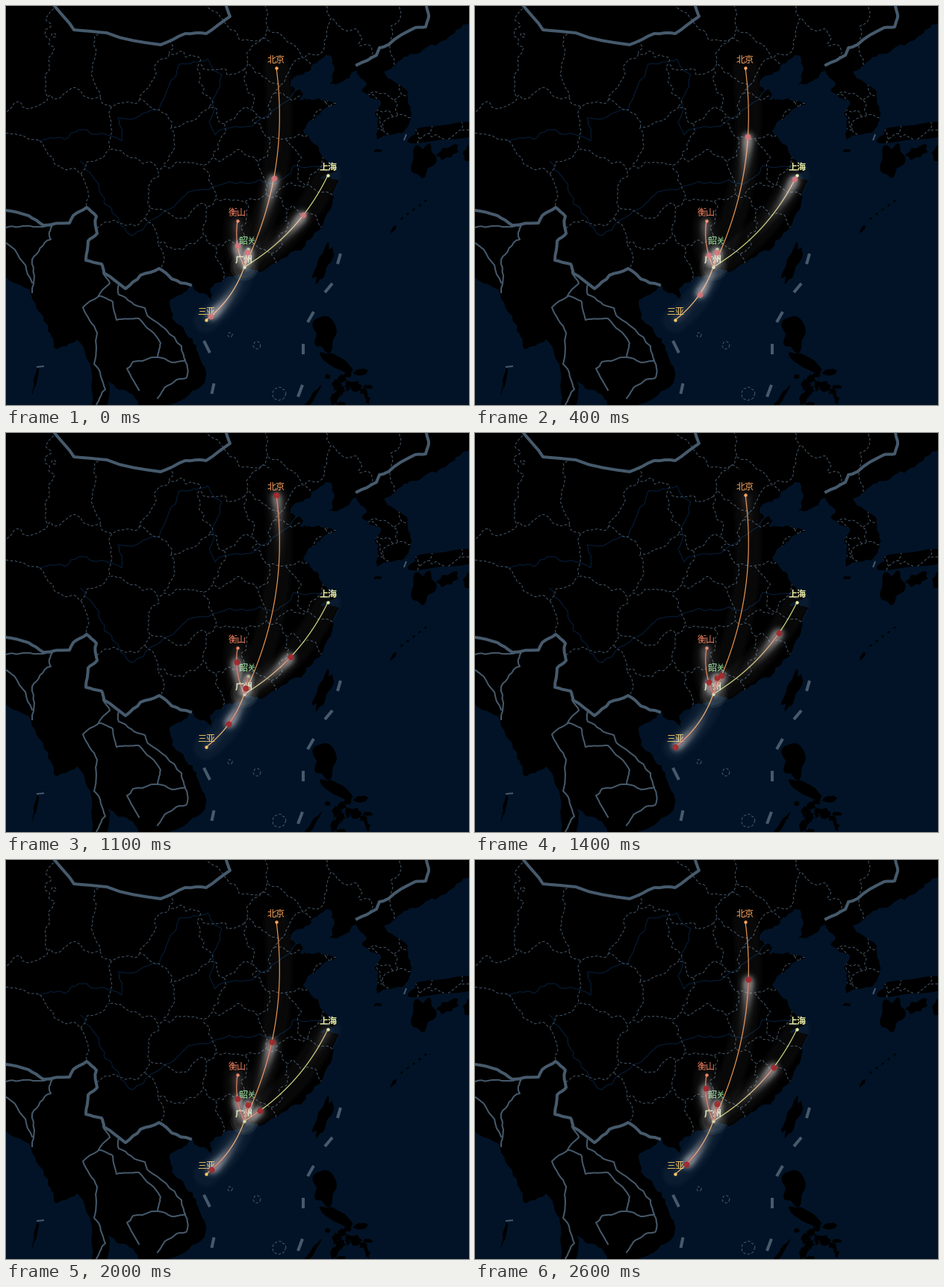
These frames come from a looping animation (620x535 px, 2700 ms). A matplotlib script:

```python
import numpy as np
import matplotlib.pyplot as plt
from matplotlib.animation import FuncAnimation

W, H, DPI = 620, 535, 100
PX = 72 / DPI
FRAMES, STEP = 27, 100
SEA, LAND, BORDER, PROVINCE, RIVER = "#021327", "#000000", "#465a6c", "#45586a", "#06203f"

plt.rcParams["font.family"] = "Noto Sans CJK JP"
rng = np.random.default_rng(4)

fig = plt.figure(figsize=(W / DPI, H / DPI), dpi=DPI, facecolor=SEA)
ax = fig.add_axes([0, 0, 1, 1])
ax.set_axis_off()


# ---- map ----

def rough(*coords, amp=0.1, limit=3.0, rounds=3):
    """Turn flat x, y key points into a polyline with small natural wiggles."""
    pts = np.array(coords, float).reshape(-1, 2)
    for _ in range(rounds):
        d = np.diff(pts, axis=0)
        size = np.hypot(*d.T)[:, None]
        shift = np.clip(size * rng.normal(0, amp, size.shape), -limit, limit)
        normal = np.column_stack([-d[:, 1], d[:, 0]]) / np.maximum(size, 1e-6)
        out = np.empty((len(pts) * 2 - 1, 2))
        out[::2] = pts
        out[1::2] = (pts[:-1] + pts[1:]) / 2 + normal * shift
        pts = out
    return pts


def land(pts):
    return ax.fill(*pts.T, color=LAND, lw=0, zorder=1)[0]


def line(pts, color, width, z=4, **style):
    ax.plot(*pts.T, color=color, lw=width * PX, zorder=z, **style)


def island(x, y, rx, ry, tilt=0):
    """A ragged ellipse, tilted clockwise in degrees."""
    a = np.linspace(0, 2 * np.pi, 36)
    wobble = 1 + sum(rng.normal(0, 0.08) * np.sin(k * a + k) for k in range(2, 8))
    u, v, c, s = rx * wobble * np.cos(a), ry * wobble * np.sin(a), *np.array(
        [np.cos(np.radians(tilt)), np.sin(np.radians(tilt))])
    return land(np.column_stack([x + u * c - v * s, y + u * s + v * c]))


def wave_noise(x, y):
    """Sum of random plane waves, larger for longer wavelengths."""
    total = np.zeros_like(x)
    for length in np.geomspace(10, 90, 14):
        angle, phase = rng.uniform(0, 2 * np.pi, 2)
        k = 2 * np.pi / length
        total += 0.05 * length * np.sin(k * (x * np.cos(angle) + y * np.sin(angle)) + phase)
    return total


def provinces(seeds, outline):
    """Dashed borders between the areas nearest to each seed, on a warped grid."""
    x, y = np.meshgrid(np.arange(0, W + 2, 2.0), np.arange(0, H + 2, 2.0))
    wx, wy = x + wave_noise(x, y), y + wave_noise(x, y)
    dist = np.array([np.hypot(wx - sx, wy - sy) for sx, sy in seeds])
    nearest = dist.argmin(axis=0)
    for i in range(len(seeds) - 1):
        gap = np.ma.masked_where(nearest < i, dist[i] - dist[i + 1:].min(axis=0))
        if gap.count() == 0 or not gap.min() < 0 < gap.max():
            continue
        cs = ax.contour(x, y, gap, levels=[0], colors=PROVINCE, linewidths=PX, zorder=3)
        cs.set_linestyle((0, (3.5, 2.5)))
        cs.set_clip_path(outline)


def draw_map():
    north_line = rough(65, 0, 91, 32, 135, 36, 207, 52, 240, 37, 268, 37, 300, 14, 295, 0,
                       amp=0.02, rounds=2)
    east_line = rough(563, 0, 566, 15, 562, 28, 548, 29, 512, 52, 500, 56, 496, 66, 470, 79,
                      amp=0.03, rounds=2)
    south_line = rough(0, 274, 30, 281, 50, 294, 85, 291, 90, 281, 108, 270, 121, 282, 122, 305,
                       110, 315, 107, 341, 128, 346, 131, 358, 160, 379, 180, 361, 205, 352,
                       222, 366, 247, 374, amp=0.04, rounds=2)
    coast = rough(470, 86, 446, 103, 433, 105, 440, 84, 436, 69, 428, 66, 405, 88, 384, 97,
                  381, 107, 398, 117, 394, 126, 418, 124, 444, 131, 416, 147, 398, 167,
                  419, 190, 433, 212, 441, 222, 421, 231, 446, 235, 437, 264, 421, 299,
                  395, 328, 345, 355, 325, 352, 311, 361, 283, 371, 273, 380, 275, 396,
                  265, 385, 247, 374, amp=0.12)
    corner = np.array([[-20, 274], [-20, -20], [65, -20]])
    china = land(np.vstack([north_line, east_line, coast, south_line[::-1], corner]))

    korea = land(rough(640, -20, 640, 8, 612, 25, 588, 46, 555, 62, 528, 73, 506, 88, 536, 112,
                       541, 150, 534, 168, 497, 179, 499, 152, 494, 142, 502, 128, 476, 113,
                       483, 104, 469, 86, 450, 50, 40, 50, 40, -20))
    land(rough(-20, 274, 110, 260, 240, 345, 247, 375, 220, 394, 222, 418, 250, 446, 266, 484,
               266, 505, 220, 534, 190, 560, 170, 521, 136, 503, 133, 560, 122, 560, 115, 492,
               95, 447, 65, 459, 56, 428, 31, 380, -20, 350))

    island(425, 345, 8, 27, 22)
    island(558, 207, 14, 23, 12)
    island(592, 196, 13, 8, -20)
    island(626, 198, 14, 12)
    island(498, 194, 5, 2)
    island(427, 438, 16, 22)
    island(443, 478, 24, 8, 30)
    island(409, 527, 3, 20, 35)
    island(40, 500, 2, 16, 12)
    island(519, 299, 2, 6, 35)
    japan = island(592, 169, 56, 11, -8)
    for x, y in rng.uniform((430, 490), (488, 535), (22, 2)):
        island(x, y, *rng.uniform(2, 7, 2))
    for x in np.linspace(530, 562, 5):
        island(x, 285 - 0.75 * (x - 530), 2, 1.2, -35)

    seats = [(362, 84), (379, 101), (338, 115), (306, 118), (300, 50), (372, 145), (325, 180),
             (252, 182), (222, 135), (192, 165), (85, 160), (165, 245), (238, 255), (235, 295),
             (165, 335), (252, 342), (319, 345), (298, 285), (313, 230), (348, 288), (390, 312),
             (410, 258), (372, 212), (402, 195), (435, 228), (445, 65), (480, 20), (45, 245),
             (30, 72), (90, 75), (150, 75), (400, 20)]
    provinces(seats, china)
    provinces(rng.uniform((495, 105), (542, 180), (9, 2)), korea)
    provinces([(x, 170 + 8 * (-1) ** k) for k, x in enumerate(range(550, 640, 14))], japan)
    for x, y, r in ((366, 520, 9), (336, 455, 5), (300, 441, 3)):
        a = np.linspace(0, 2 * np.pi, 12)
        ring = np.column_stack([x + r * np.cos(a), y + r * np.sin(a)])
        line(rough(*ring.ravel(), rounds=1), PROVINCE, 1, 3, dashes=(3.5, 2.5))

    for river in ((42, 180, 78, 179, 100, 166, 155, 181, 150, 150, 205, 140, 232, 78, 270, 71,
                   289, 92, 277, 125, 280, 173, 335, 156, 390, 111),
                  (100, 208, 127, 252, 142, 277, 170, 308, 220, 272, 255, 247, 315, 236, 365, 236,
                   385, 214, 432, 222)):
        line(rough(*river, amp=0.12), RIVER, 1, 2)

    for border in ((0, 297, 36, 296, 62, 294, 60, 313, 35, 340, 35, 384),
                   (0, 318, 12, 327, 35, 371),
                   (131, 360, 139, 372, 103, 404, 122, 438, 118, 480, 133, 514, 121, 535),
                   (124, 389, 143, 397, 148, 421, 178, 419, 207, 452, 203, 471, 170, 477,
                    162, 486, 178, 515),
                   (151, 373, 151, 387, 186, 405, 190, 416, 235, 456, 242, 480, 241, 499,
                    212, 512, 203, 526),
                   (203, 471, 222, 478, 240, 475)):
        line(rough(*border, amp=0.06), BORDER, 2)
    for frontier in (north_line, east_line, south_line):
        line(frontier, BORDER, 4)

    # short sea marks: centre and half extent
    for x, y, dx, dy in ((446, 339, 2, 7), (432, 378, 5, 6), (408, 417, 4, 7), (398, 460, 0, 7),
                         (394, 516, 3, 8), (269, 457, -4, 8), (277, 513, 1.5, 7)):
        line(np.array([[x + dx, y - dy], [x - dx, y + dy]]), BORDER, 4, solid_capstyle="butt")
    for x, y, dx, dy in ((46, 483.5, -5, -0.5), (534.5, 176, 1.5, 4)):
        line(np.array([[x + dx, y - dy], [x - dx, y + dy]]), BORDER, 2, solid_capstyle="butt")


# ---- routes ----

HUB = np.array([319.0, 350.0])


class Route:
    """A curved path from the hub; phase grows by `rate` per ms and rests at the end."""

    def __init__(self, name, end, bend, color, text, start, rate, cycle):
        self.name, self.end, self.color, self.text = name, np.array(end, float), color, text
        self.start, self.rate, self.cycle = start, rate, cycle
        dx, dy = self.end - HUB
        self.ctrl = (HUB + self.end) / 2 + bend * np.array([-dy, dx])

    def at(self, t):
        t = np.asarray(t, float)[..., None]
        return (1 - t) ** 2 * HUB + 2 * t * (1 - t) * self.ctrl + t ** 2 * self.end

    def phase(self, ms):
        return (self.start + self.rate * ms) % self.cycle


ROUTES = [
    Route("北京", (362, 83), 0.15, "#e8964f", "#ffa55c", 0.458, 0.00052, 1.09),
    Route("上海", (431, 227), 0.15, "#d3d983", "#e9eda4", 0.63, 0.00084, 1.082),
    Route("衡山", (310, 288), -0.15, "#e57b52", "#f0805f", 0.48, 0.002225, 1.11),
    Route("韶关", (324, 326), 0.05, "#c98a58", "#8fdc92", 0.83, 0.0055, 1.09),
    Route("三亚", (268, 421), -0.15, "#f0b870", "#f8c860", 0.91, 0.00165, 1.105),
]


def label(x, y, text, color, weight="normal"):
    ax.text(x, y, text, color=color, fontsize=12 * PX, ha="center", va="center_baseline",
            weight=weight, zorder=7)


def draw_routes():
    t = np.linspace(0, 1, 80)
    for r in ROUTES:
        path = r.at(t)
        for width in (37, 30):
            line(path, "white", width, 5, alpha=0.02, solid_capstyle="round")
        line(path, r.color, 1.2, 6)
        ax.plot(*r.end, "o", color=r.text, ms=4.4 * PX, mew=0, zorder=6)
        label(r.end[0], r.end[1] - 12, r.name, r.text, "bold" if r.name == "上海" else "normal")
    ax.plot(*HUB, "o", color="#d8ecb0", ms=4.4 * PX, mew=0, zorder=6)
    label(319, 339, "广州", "#dcf0b4", "bold")


# ---- moving heads and their fading tails ----

X0, X1, Y0, Y1 = 230, 470, 50, 450
GX, GY = np.arange(X0, X1) + 0.5, np.arange(Y0, Y1) + 0.5
AGES = np.arange(0, 800, 10)
FADE = 170
SWITCH_MS = 900


def tails(ms, sigma, gain):
    """Opacity of the tails; where routes overlap the strongest one shows."""
    strongest = np.zeros((len(GY), len(GX)))
    for r in ROUTES:
        phases = r.phase(ms - AGES)
        moving = phases <= 1
        pts = r.at(phases[moving])
        power = gain * np.exp(-AGES[moving] / FADE)
        gx = np.exp(-((GX - pts[:, :1]) / sigma) ** 2 / 2)
        gy = np.exp(-((GY - pts[:, 1:]) / sigma) ** 2 / 2)
        strongest = np.maximum(strongest, (gy * power[:, None]).T @ gx)
    return 1 - np.exp(-strongest)


draw_map()
draw_routes()
glow = ax.imshow(np.zeros((Y1 - Y0, X1 - X0, 4)), extent=(X0, X1, Y1, Y0),
                 interpolation="nearest", zorder=8)
heads, = ax.plot([], [], "o", ms=8 * PX, mew=0, zorder=9)
ax.set(xlim=(0, W), ylim=(H, 0), aspect="auto")


def update(i):
    ms = i * STEP
    late = ms >= SWITCH_MS
    core = np.array([0.70, 0.16, 0.16]) if late else np.array([0.88, 0.50, 0.49])
    white = 0.72 * tails(ms, 5, 0.23)[..., None]
    red = (0.75 if late else 0.5) * tails(ms, 1.4, 0.35)[..., None]
    alpha = 1 - (1 - white) * (1 - red)
    rgb = (0.92 * white * (1 - red) + core * red) / np.maximum(alpha, 1e-6)
    glow.set_data(np.clip(np.concatenate([rgb, alpha], axis=2), 0, 1))
    pts = np.array([r.at(min(r.phase(ms), 1)) for r in ROUTES])
    heads.set_data(pts[:, 0], pts[:, 1])
    heads.set_color("#a2252a" if late else "#d9757a")
    heads.set_alpha(0.9 if late else 0.85)
    return glow, heads


anim = FuncAnimation(fig, update, frames=FRAMES, interval=STEP, repeat=True, repeat_delay=0)
plt.show()
```
